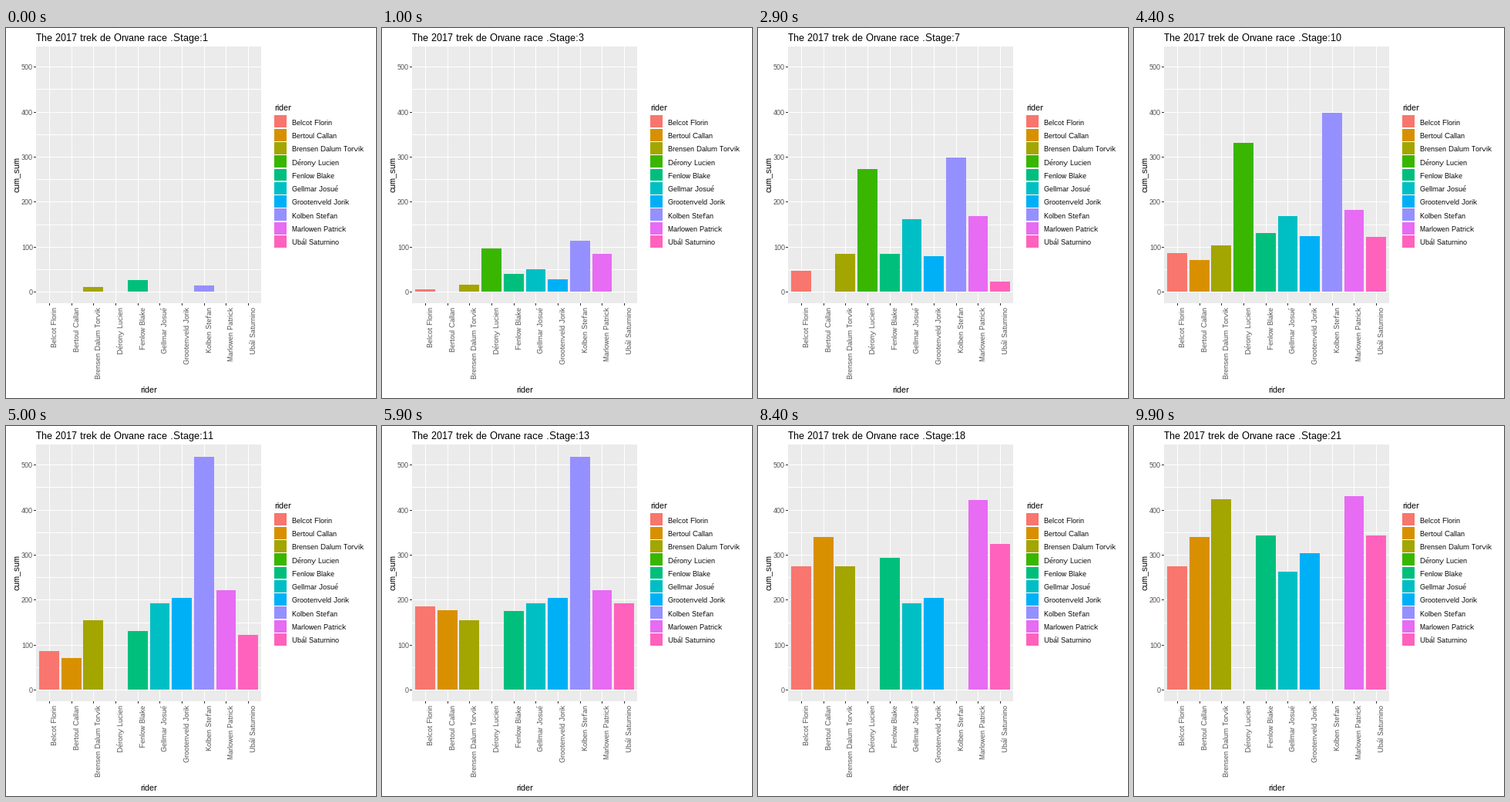
A matplotlib script that plays this animation: 480 by 480 pixels, repeating every 10000 ms.

```python
import numpy as np
import matplotlib.pyplot as plt
from matplotlib.animation import FuncAnimation
from matplotlib.patches import Rectangle

plt.rcParams.update({
    "font.family": "Liberation Sans",
    "text.hinting": "native",
    "text.hinting_factor": 1,
    "toolbar": "None",
})

SIZE, FRAMES = 480, 100
LEFT, RIGHT, TOP, BOTTOM = 39, 331, 24, 357
ZERO_Y, PX_PER_POINT = 342.3, 0.5844
FIRST_X, STEP = 56.02, 28.68
KEY_Y, KEY_STEP, KEY_HALF = 121.4, 17.28, 7.93
GREY, TICK = "#4D4D4D", "#333333"

# One letter per stage: Sprint, Mountain, Hills, or open to anyone.
TERRAIN = "-S-SMSS-MSSM-H-HMM--S"


class Rider:
    """Scores a usual haul on each terrain, apart from a few special days."""

    def __init__(self, name, color, usual, days, gone=None):
        self.name, self.color, self.gone = name, color, gone
        self.totals = np.cumsum([days.get(stage, usual.get(kind, 0))
                                 for stage, kind in enumerate(TERRAIN, 1)])


riders = [
    Rider("Belcot Florin", "#F8766D", dict(M=40, H=4), {3: 6, 12: 100}),
    Rider("Bertoul Callan", "#D89000", {},
          {9: 70, 13: 106, 15: 32, 17: 32, 18: 100}),
    Rider("Brensen Dalum Torvik", "#A3A500", dict(S=6, H=60),
          {1: 10, 7: 70, 11: 50, 19: 100, 21: 50}),
    Rider("Dérony Lucien", "#39B600", dict(S=70),
          {3: 26, 4: 100, 7: 8}, gone=10),
    Rider("Fenlow Blake", "#00BF7D", dict(M=45, H=14),
          {1: 26, 3: 14, 20: 50}),
    Rider("Gellmar Josué", "#00BFC4", dict(S=50),
          {7: 14, 10: 6, 11: 22, 21: 70}),
    Rider("Grootenveld Jorik", "#00B0F6", dict(S=28),
          {4: 0, 10: 50, 11: 70, 21: 100}),
    Rider("Kolben Stefan", "#9590FF", dict(S=100), {1: 14, 4: 4}, gone=18),
    Rider("Marlowen Patrick", "#E76BF3", dict(S=22, H=100),
          {3: 62, 7: 50, 10: 4, 11: 40, 21: 8}),
    Rider("Ubál Saturnino", "#FF62BC", dict(M=70),
          {5: 22, 9: 100, 14: 30, 18: 32, 20: 18}),
]

stage_frames = np.round(np.linspace(0, FRAMES - 1, len(TERRAIN)))

fig = plt.figure(figsize=(SIZE / 72, SIZE / 72), dpi=72, facecolor="white")
ax = fig.add_axes([0, 0, 1, 1])
ax.set(xlim=(0, SIZE), ylim=(SIZE, 0))
ax.axis("off")


def box(x0, y0, x1, y1, color):
    x0, y0, x1, y1 = (round(v) for v in (x0, y0, x1, y1))
    return ax.add_patch(Rectangle((x0, y0), x1 - x0, y1 - y0, facecolor=color,
                                  linewidth=0, antialiased=False))


def label(x, y, text, size, color="black", ha="left", rotation=0):
    return ax.text(x, y, text, fontsize=size, color=color, ha=ha,
                   va="baseline", rotation=rotation, rotation_mode="anchor")


def y_of(points):
    return round(float(ZERO_Y - points * PX_PER_POINT))


# panel, grid and value axis
box(LEFT, TOP, RIGHT, BOTTOM, "#EBEBEB")
for value in range(0, 501, 50):
    y = y_of(value)
    box(LEFT, y, RIGHT, y + 1, "white")
    if value % 100 == 0:
        box(LEFT - 3, y, LEFT, y + 1, TICK)
        label(35, y + 4, str(value), 9, GREY, ha="right")

# rider axis and legend
for i, rider in enumerate(riders):
    x = round(FIRST_X + i * STEP)
    box(x, TOP, x + 1, BOTTOM, "white")
    box(x, BOTTOM, x + 1, BOTTOM + 3, TICK)
    label(x + 10, 362, rider.name, 9, GREY, ha="right", rotation=90)

    y = KEY_Y + i * KEY_STEP
    box(348.2, y - KEY_HALF, 364.1, y + KEY_HALF, rider.color)
    label(371, round(y + 4.4), rider.name, 9)

label(348, 107, "rider", 11)
label(185, 473, "rider", 11, ha="center")
label(17, 190, "cum_sum", 11, ha="center", rotation=90)
title = label(LEFT, 17, "", 13)

base = y_of(0)
half = 0.45 * STEP
centers = FIRST_X + STEP * np.arange(len(riders))
bars = [box(float(c - half), base, float(c + half), base, rider.color)
        for c, rider in zip(centers, riders)]


def update(frame):
    stage = round(1 + frame * (len(TERRAIN) - 1) / (FRAMES - 1))
    title.set_text(f"The 2017 trek de Orvane race .Stage:{stage}")
    for bar, rider in zip(bars, riders):
        top = y_of(np.interp(frame, stage_frames, rider.totals))
        bar.set_y(top)
        bar.set_height(base - top)
        bar.set_visible(rider.gone is None
                        or frame < stage_frames[rider.gone - 1])
    return [title, *bars]


anim = FuncAnimation(fig, update, frames=FRAMES, interval=100, repeat=True,
                     repeat_delay=0, blit=False)
plt.show()
```
